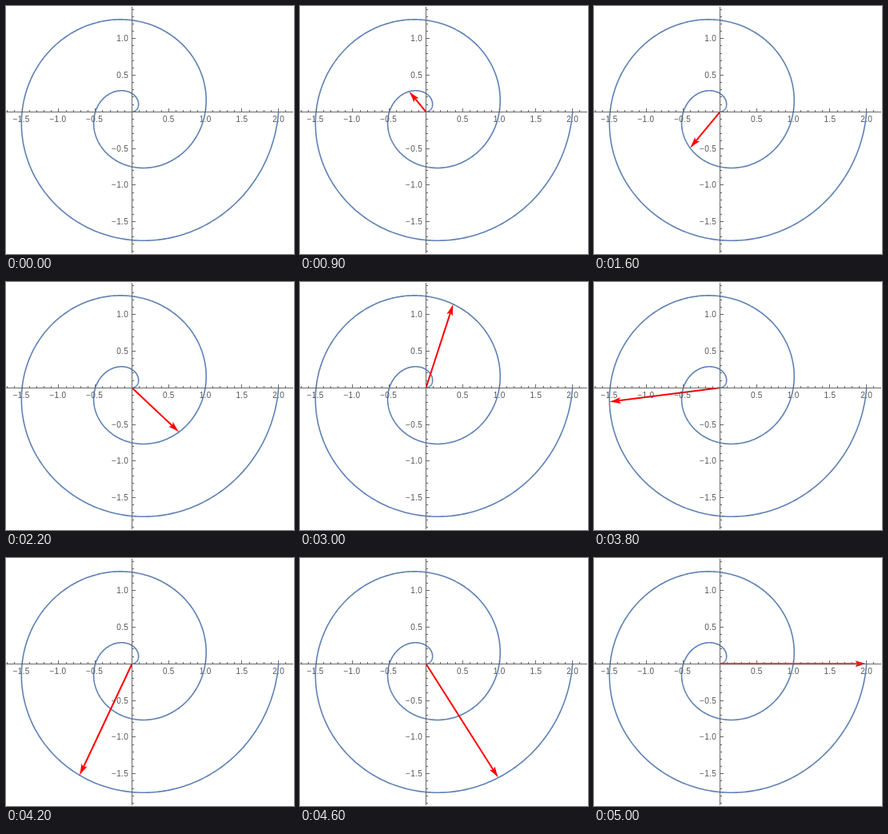
Animation of 360x310 px, one loop 5100 ms. Source, as an HTML page with a canvas:

```html
<!DOCTYPE html>
<html>
<head>
<meta charset="utf-8">
<title>Spiral</title>
<style>
  html, body { margin: 0; width: 360px; height: 310px; overflow: hidden; background: #fff; }
  canvas { display: block; }
</style>
</head>
<body>
<canvas id="stage" width="360" height="310"></canvas>
<script>
const ctx = document.getElementById('stage').getContext('2d');
const X0 = 157.5, Y0 = 132.3, UNIT = 91.6, TURNS = 2;
const STEPS = 50, STEP_MS = 100;
const HEAD = 14.2, HALF = 4, NOTCH = 11.4;

const radius = angle => UNIT * angle / (2 * Math.PI);
const snap = v => Math.floor(v) + 0.5;

function drawSpiral() {
  ctx.beginPath();
  for (let i = 0; i <= 600; i++) {
    const a = TURNS * 2 * Math.PI * i / 600, r = radius(a);
    ctx.lineTo(X0 + r * Math.cos(a), Y0 - r * Math.sin(a));
  }
  ctx.strokeStyle = '#5e81b5';
  ctx.lineWidth = 1.6;
  ctx.stroke();
}

function drawArrow(angle) {
  const length = radius(angle);
  if (!length) return;
  ctx.save();
  ctx.translate(X0, Y0);
  ctx.rotate(-angle);
  ctx.fillStyle = '#f00';
  if (length > NOTCH) ctx.fillRect(0, -1, length - NOTCH, 2);
  ctx.translate(length, 0);
  ctx.beginPath();
  ctx.moveTo(0, 0);
  ctx.quadraticCurveTo(-HEAD / 2, -1.6, -HEAD, -HALF);
  ctx.lineTo(-NOTCH, 0);
  ctx.lineTo(-HEAD, HALF);
  ctx.quadraticCurveTo(-HEAD / 2, 1.6, 0, 0);
  ctx.fill();
  ctx.restore();
}

function drawAxes() {
  const ax = snap(X0), ay = snap(Y0);
  const label = n => (n / 10).toFixed(1).replace('-', '−');
  const line = (x1, y1, x2, y2) => { ctx.moveTo(x1, y1); ctx.lineTo(x2, y2); };
  const tickSize = n => n % 5 ? 2.5 : 4.5;

  ctx.strokeStyle = '#666';
  ctx.fillStyle = '#555';
  ctx.lineWidth = 1;
  ctx.font = '10px "Liberation Sans", Arial, sans-serif';
  ctx.letterSpacing = '0.3px';
  ctx.textBaseline = 'alphabetic';
  ctx.beginPath();
  line(0, ay, 359, ay);
  line(ax, 1, ax, 309);

  ctx.textAlign = 'center';
  for (let n = -17; n <= 21; n++) {
    const x = X0 + n * UNIT / 10;
    line(snap(x), ay, snap(x), ay - tickSize(n));
    if (n && n % 5 === 0) ctx.fillText(label(n), n < 0 ? x - 1 : x, 145);
  }
  ctx.textAlign = 'right';
  for (let n = -19; n <= 14; n++) {
    const y = Y0 - n * UNIT / 10;
    line(ax, snap(y), ax + tickSize(n), snap(y));
    if (n && n % 5 === 0) ctx.fillText(label(n), 153, Math.round(y + 3.5));
  }
  ctx.stroke();
}

function frame(now) {
  const step = Math.floor(now / STEP_MS) % (STEPS + 1);
  ctx.fillStyle = '#fff';
  ctx.fillRect(0, 0, 360, 310);
  drawSpiral();
  drawArrow(TURNS * 2 * Math.PI * step / STEPS);
  drawAxes();
  requestAnimationFrame(frame);
}
requestAnimationFrame(frame);
</script>
</body>
</html>
```
